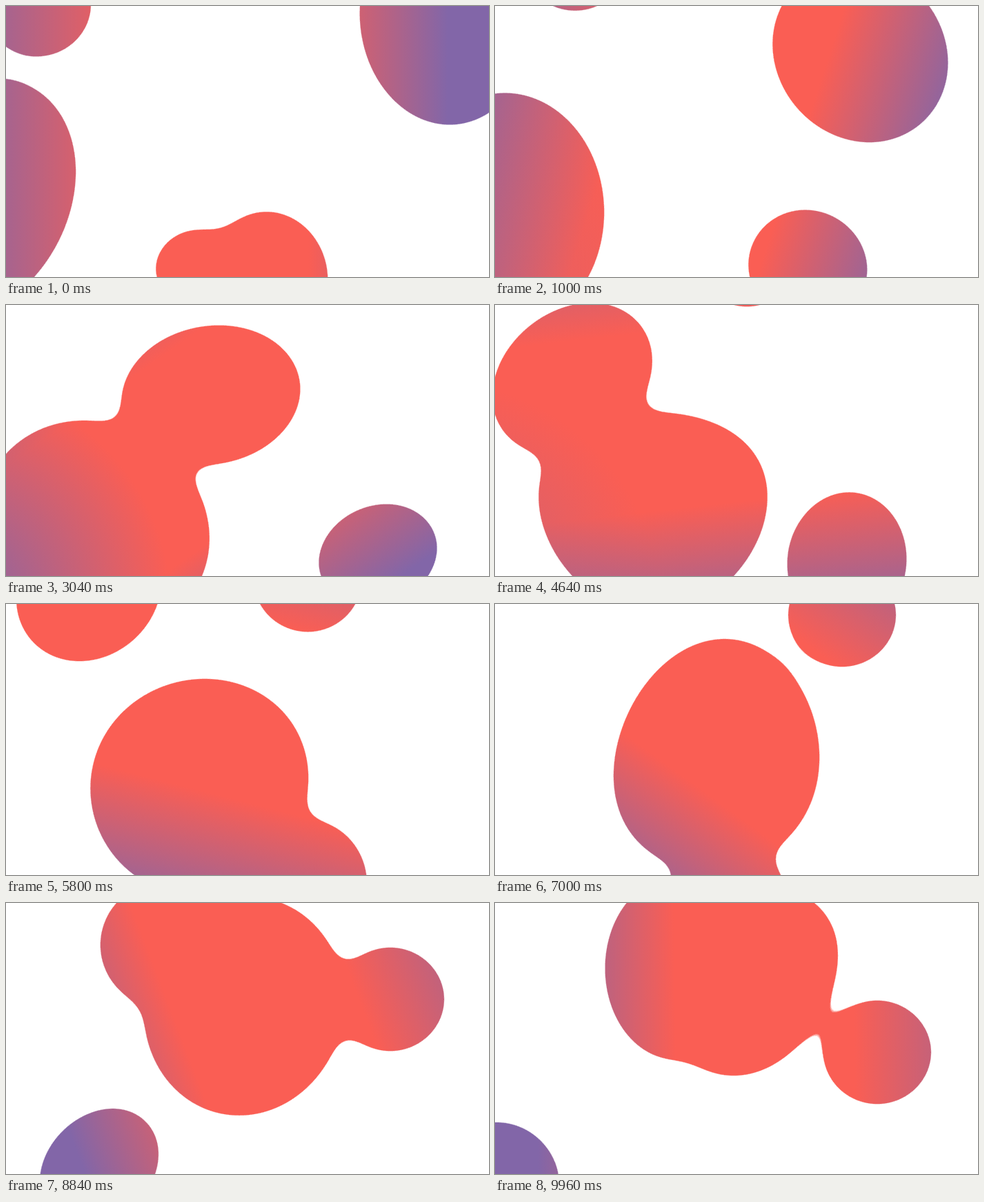
Recreate the animation shown at these times as an HTML page. Size 700 px wide and 394 px high, loop 10 s.

```html
<!DOCTYPE html>
<html lang="en">
<head>
<meta charset="utf-8">
<title>Liquid blobs</title>
<style>
  html, body { margin: 0; width: 100%; height: 100%; overflow: hidden; background: #fff; }
  svg { display: block; width: 100vw; height: 100vh; }
</style>
</head>
<body>
<svg viewBox="0 0 700 394">
  <defs>
    <linearGradient id="sweep" gradientUnits="userSpaceOnUse" x1="-80" y1="197" x2="640" y2="197">
      <stop offset="0" stop-color="#8266a8"/>
      <stop offset=".36" stop-color="#fa5e54"/>
      <stop offset=".72" stop-color="#fa5e54"/>
      <stop offset="1" stop-color="#8266a8"/>
    </linearGradient>
    <radialGradient id="shade" gradientUnits="userSpaceOnUse" cx="-90" cy="440" r="330">
      <stop offset=".2" stop-color="#8266a8"/>
      <stop offset="1" stop-color="#8266a8" stop-opacity="0"/>
    </radialGradient>
    <filter id="goo" filterUnits="userSpaceOnUse" x="-120" y="-120" width="940" height="640"
            color-interpolation-filters="sRGB">
      <feGaussianBlur stdDeviation="18"/>
      <feComponentTransfer><feFuncA type="linear" slope="36" intercept="-17.5"/></feComponentTransfer>
    </filter>
    <mask id="blobs" maskUnits="userSpaceOnUse" x="0" y="0" width="700" height="394">
      <path id="shape" fill="#fff" filter="url(#goo)"/>
    </mask>
  </defs>
  <g mask="url(#blobs)">
    <rect width="700" height="394" fill="url(#sweep)"/>
    <rect id="corner" width="700" height="394" fill="url(#shade)"/>
  </g>
</svg>
<script>
const LOOP = 10000, STEP = 40, BLUR = 18;
const times = [0, 2040, 3040, 4640, 7000, 8840, 9960];

// Centre, half sizes, skew and egg shape; one value per time, or one for all
const roamer = {
  x: [638, 415, 297, 112, 165, 224, 262],
  y: [17, 117, 131, 107, -122, 61, 95],
  w: [125, 129, 130, 116, 95, 87, 102],
  h: [156, 105, 101, 110, 95, 90, 133],
  skew: [.04, .13, -.09, -.24]
};
const giant = {
  x: [-49, 80, 130, 229, 321, 345, 357],
  y: [281, 316, 324, 278, 237, 150, 86],
  w: [150, 140, 165, 166, 149, 145, 140],
  h: [176, 168, 156, 146, 168, 159, 140],
  skew: [-.23, .2, .1, 0, -.08, -.05, -.08],
  egg: [0, 0, 0, .165, -.11, 0, .18]
};
const diver = {
  x: [45, 190, 262, 365, 503, 557, 554],
  y: [-2, -125, -110, -73, 16, 140, 217],
  w: 78, h: 75
};
const floater = {
  x: [380, 521, 539, 510, 338, 135, 7],
  y: [395, 366, 364, 373, 432, 385, 405],
  w: 86,
  h: [96, 72, 74, 101, 80, 86, 86],
  skew: [.03, .03, -.15, -.04, 0, -.24, .05]
};
const sinker = { x: 280, y: t => 382 + Math.min(t / 11, 130), w: 63, h: 56 };
const all = [roamer, giant, diver, floater, sinker];

const byId = id => document.getElementById(id);
const shape = byId("shape"), sweep = byId("sweep"), corner = byId("corner");

// Cubic Hermite through the values
function value(list = 0, t) {
  if (typeof list === "function") return list(t);
  if (!Array.isArray(list)) return list;
  const last = times.length - 1, at = i => list[i] || 0;
  const slope = i => {
    const a = Math.max(i - 1, 0), b = Math.min(i + 1, last);
    return (at(b) - at(a)) / (times[b] - times[a]);
  };
  let i = 0;
  while (i < last - 1 && t >= times[i + 1]) i++;
  const d = times[i + 1] - times[i];
  const u = Math.min((t - times[i]) / d, 1), v = 1 - u;
  return at(i) * (1 + 2 * u) * v * v + at(i + 1) * u * u * (3 - 2 * u) +
    d * u * v * (v * slope(i) - u * slope(i + 1));
}

function outline(blob, t) {
  const [cx, cy, w, h, skew, egg] =
    ["x", "y", "w", "h", "skew", "egg"].map(name => value(blob[name], t));
  const pad = BLUR * BLUR / 2 / Math.sqrt(w * h); // offsets the shrinkage of the blur
  const phase = Math.asin(skew), pts = [];
  for (let i = 0; i < 90; i++) {
    const a = i * Math.PI / 45, s = Math.sin(a + phase);
    const x = cx + (w + pad) * Math.cos(a);
    const y = cy + (h + pad) * s * (1 + egg * s);
    pts.push(x.toFixed(2) + " " + y.toFixed(2));
  }
  return "M" + pts.join("L") + "Z";
}

function draw(now) {
  const t = Math.floor(now % LOOP / STEP) * STEP;
  shape.setAttribute("d", all.map(blob => outline(blob, t)).join(""));
  sweep.setAttribute("gradientTransform", `rotate(${t / LOOP * 180} 350 197)`);
  const glow = t < 6000 ? Math.sin(Math.PI * t / 6000) ** 2 : 0;
  corner.setAttribute("opacity", (glow * .85).toFixed(3));
}

const start = performance.now();
function tick() {
  draw(performance.now() - start);
  requestAnimationFrame(tick);
}
tick();
</script>
</body>
</html>
```
